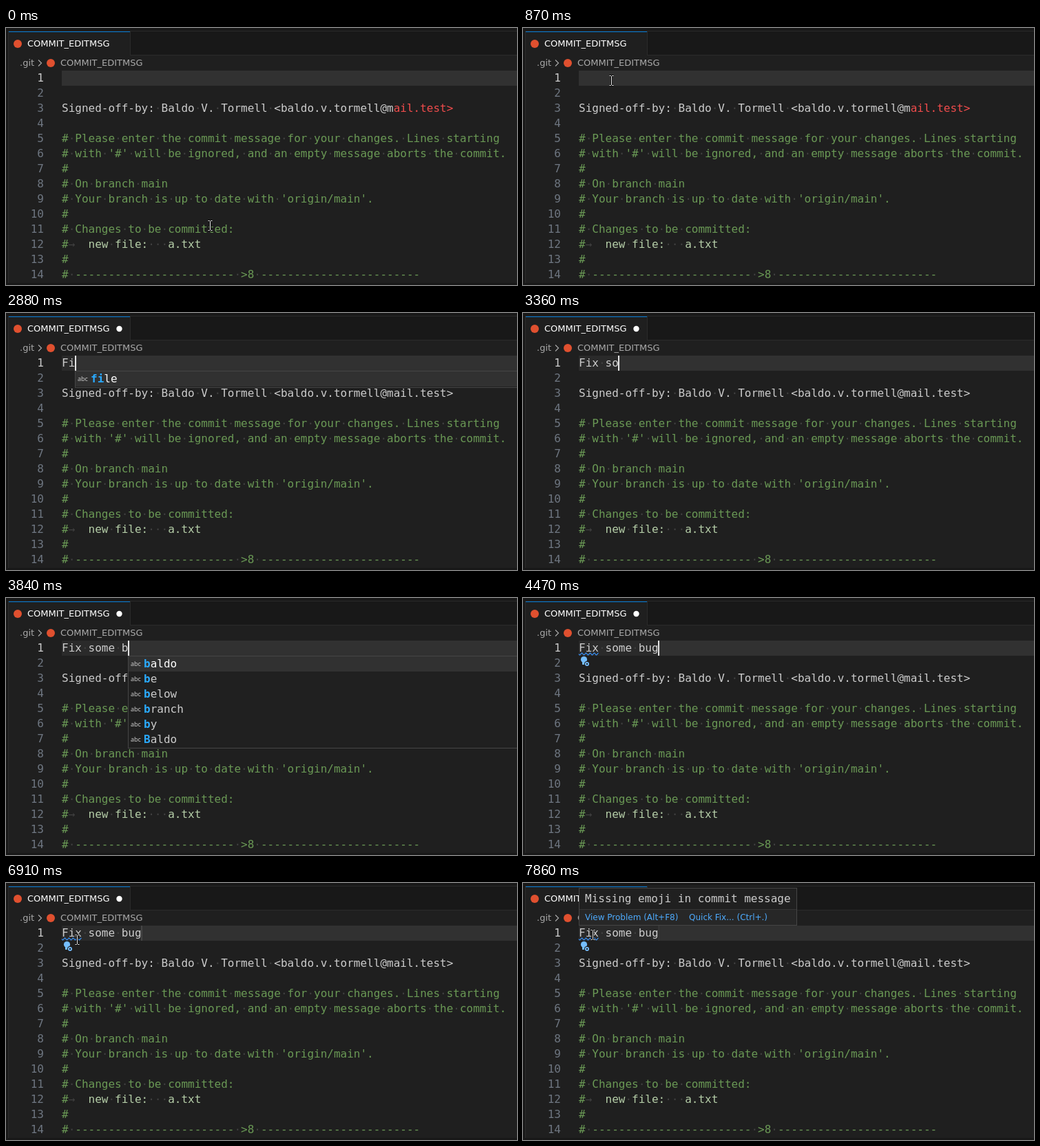
Recreate the animation shown at these times as an HTML page with a canvas. Size 742 by 374 pixels, loop 8000 ms.

```html
<!DOCTYPE html>
<html lang="en">
<head>
<meta charset="utf-8">
<title>Commit message editor</title>
<style>
  html, body { margin: 0; width: 100%; height: 100%; overflow: hidden; background: #1f1f1f; }
  canvas { display: block; }
</style>
</head>
<body>
<canvas id="stage" width="742" height="374"></canvas>
<script>
const ctx = document.getElementById('stage').getContext('2d');
const LOOP = 8000, W = 742, H = 374;
const LEFT = 81, TOP = 62, ROW = 22;
const MONO = '16px "DejaVu Sans Mono", monospace';
const MONO_BOLD = 'bold ' + MONO;
const UI = '13px "DejaVu Sans", sans-serif';
const UI_SMALL = '12px "DejaVu Sans", sans-serif';
const GREEN = '#6a9955', PLAIN = '#cccccc', BLUE = '#2aaaff', LINK = '#4daafc';

const SIGNED = 'Signed-off-by: Baldo V. Tormell <baldo.v.tormell@mail.test>';
const SUBJECT_LIMIT = 50;
const DASHES = '-'.repeat(24);
const COMMENTS = [
  '# Please enter the commit message for your changes. Lines starting',
  "# with '#' will be ignored, and an empty message aborts the commit.",
  '#',
  '# On branch main',
  "# Your branch is up to date with 'origin/main'.",
  '#',
  '# Changes to be committed:',
  '#',
  '#',
  `# ${DASHES} >8 ${DASHES}`
];

const MESSAGE = 'Fix some bug';
const KEYSTROKES = [2720, 2880, 3040, 3120, 3190, 3350, 3430, 3510, 3680, 3760, 3910, 4230];
const SUGGESTIONS = [
  { from: 2800, to: 2880, match: 1, words: ['file', 'for'] },
  { from: 2880, to: 3040, match: 2, words: ['file'] },
  { from: 3840, to: 3910, match: 1, words: ['baldo', 'be', 'below', 'branch', 'by', 'Baldo'] }
];

const CARET_ON = 1110, FADE = 180;
const CARET_FADES = [1750, 2150, 4860, 5260, 5810, 6220, 6770, 7200, 7700];
const SQUIGGLE_AT = 4310, BULB_AT = 4470, HOVER_AT = 7200;

// Each pointer track is a list of [time, x, y].
const POINTER_TRACKS = [
  { until: 1110, keys: [[0, 296.5, 287.5], [870, 128.5, 76.5], [950, 127.5, 75.5]] },
  { until: 1900, keys: [[1110, 187.5, 75.5], [1500, 187.5, 75.5], [1900, 297.5, 160.5]] },
  { until: LOOP, keys: [[5660, 310.5, 326.5], [5970, 208.5, 239.5], [6440, 116.5, 128.5], [6980, 101.5, 75.5]] }
];

const clamp = v => Math.max(0, Math.min(1, v));
const smooth = v => v * v * (3 - 2 * v);

function rect(x, y, w, h, color) {
  ctx.fillStyle = color;
  ctx.fillRect(x, y, w, h);
}

function disc(x, y, r, color) {
  ctx.fillStyle = color;
  ctx.beginPath();
  ctx.arc(x, y, r, 0, Math.PI * 2);
  ctx.fill();
}

function line(points, color, width = 1) {
  ctx.strokeStyle = color;
  ctx.lineWidth = width;
  ctx.beginPath();
  points.forEach(([x, y]) => ctx.lineTo(x, y));
  ctx.stroke();
}

function text(str, x, y, color, font = MONO, align = 'left') {
  ctx.font = font;
  ctx.fillStyle = color;
  ctx.textAlign = align;
  ctx.fillText(str, x, y);
}

ctx.font = MONO;
const CHAR = ctx.measureText('0').width;
const colX = col => LEFT + col * CHAR;
const baseline = row => TOP + (row - 1) * ROW + 16;

function code(str, row, color, col = 0) {
  text(str, colX(col), baseline(row), color);
  const dots = str.replace(/\S/g, '\u00a0').replace(/ /g, '·');
  text(dots, colX(col), baseline(row), '#414141');
}

function drawChrome(dirty) {
  rect(0, 0, W, H, '#1f1f1f');
  rect(0, 0, W, 40, '#181818');
  rect(0, 0, 3, H, '#181818');
  rect(3, 4, W, 1, '#2b2b2b');
  rect(3, 4, 1, H, '#2b2b2b');
  rect(4, 5, 176, 35, '#1f1f1f');
  rect(4, 5, 176, 1, '#0078d4');
  rect(180, 5, 1, 35, '#2b2b2b');
  rect(180, 39, W, 1, '#2b2b2b');
  rect(3, 371, W, 3, '#181818');

  disc(17, 23, 6, '#e0502f');
  text('COMMIT_EDITMSG', 31, 27, '#ffffff', UI);
  if (dirty) disc(164.5, 23, 4.2, '#ffffff');

  text('.git', 20, 55, '#a9a9a9', UI);
  line([[47, 46.5], [51.5, 51], [47, 55.5]], '#a9a9a9', 1.2);
  disc(65, 51, 6, '#e0502f');
  text('COMMIT_EDITMSG', 79, 55, '#a9a9a9', UI);
}

function drawDocument(typed) {
  rect(LEFT, TOP, W - LEFT, ROW, '#313131');
  rect(LEFT, TOP, typed.length * CHAR, ROW, '#2a2a2a');
  for (let n = 1; n <= 14; n++) {
    text(n, 55, baseline(n), n === 1 ? PLAIN : '#6e7681', MONO, 'right');
  }
  code(typed, 1, PLAIN);

  const normal = typed ? SIGNED.length : SUBJECT_LIMIT;
  code(SIGNED.slice(0, normal), 3, PLAIN);
  code(SIGNED.slice(normal), 3, '#f14c4c', normal);

  COMMENTS.forEach((str, i) => code(str, i + 5, GREEN));
  text('→', colX(1), baseline(12), '#414141');
  code('new file:   a.txt', 12, '#b5cea8', 4);
}

function caretOpacity(t) {
  if (t < CARET_ON) return 0;
  let opacity = 1;
  CARET_FADES.forEach((start, i) => {
    if (t < start) return;
    const p = smooth(clamp((t - start) / FADE));
    opacity = i % 2 ? p : 1 - p;
  });
  return opacity;
}

function drawCaret(t, col) {
  ctx.globalAlpha = caretOpacity(t);
  rect(Math.floor(colX(col)), TOP, 2, ROW, '#e4e4e4');
  ctx.globalAlpha = 1;
}

function drawSuggestions({ words, match }, caretX) {
  const x = Math.floor(caretX), h = words.length * ROW + 2;
  rect(x, 84, W - x, h + 1, '#454545');
  rect(x + 1, 85, W - x, h - 1, '#202020');
  rect(x + 1, 85, W - x, ROW, '#313131');
  words.forEach((word, i) => {
    const y = 101 + i * ROW;
    text('abc', x + 4, y - 2, '#cccccc', '9px "Noto Sans", sans-serif');
    text(word.slice(0, match), x + 23, y, BLUE, MONO_BOLD);
    text(word.slice(match), x + 23 + match * CHAR, y, i ? PLAIN : '#ffffff');
  });
}

function drawSquiggle() {
  const points = [];
  for (let x = LEFT; x <= colX(3); x += 0.5) {
    points.push([x, 81.5 + 1.4 * Math.sin((x - LEFT) * Math.PI / 3)]);
  }
  line(points, '#3794ff', 1.2);
}

function drawBulb() {
  const color = '#75beff';
  disc(88.5, 89.5, 4.6, color);
  rect(86, 92, 5, 5, color);
  disc(93, 96, 4, '#1f1f1f');
  disc(93, 96, 3, color);
  disc(93, 96, 1.2, '#1f1f1f');
}

function drawHover(t) {
  ctx.globalAlpha = clamp((t - HOVER_AT) / 150);
  rect(81, 7, 317, 55, '#454545');
  rect(82, 8, 315, 53, '#202020');
  rect(82, 38, 315, 1, '#353535');
  rect(82, 39, 315, 22, '#272727');
  text('Missing emoji in commit message', 90, 28, PLAIN);
  text('View Problem (Alt+F8)', 90, 54, LINK, UI_SMALL);
  text('Quick Fix... (Ctrl+.)', 241, 54, LINK, UI_SMALL);
  ctx.globalAlpha = 1;
}

function pointerAt(t) {
  const track = POINTER_TRACKS.find(({ until, keys }) => t >= keys[0][0] && t < until);
  if (!track) return null;
  const { keys } = track;
  const next = keys.findIndex(key => key[0] > t);
  if (next < 0) return keys[keys.length - 1].slice(1);
  const [t0, x0, y0] = keys[next - 1], [t1, x1, y1] = keys[next];
  const raw = (t - t0) / (t1 - t0);
  const p = t0 === 0 ? smooth(raw) : raw;
  return [Math.floor(x0 + (x1 - x0) * p) + 0.5, Math.floor(y0 + (y1 - y0) * p) + 0.5];
}

function drawPointer(t) {
  const pos = pointerAt(t);
  if (!pos) return;
  const [x, y] = pos;
  for (const [color, width] of [['#101010', 3], ['#f0f0f0', 1]]) {
    line([[x, y - 6], [x, y + 6]], color, width);
    for (const side of [-1, 1]) {
      line([[x - 3, y + side * 7], [x - 1, y + side * 7], [x, y + side * 6],
            [x + 1, y + side * 7], [x + 3, y + side * 7]], color, width);
    }
  }
}

function draw(t) {
  const typed = MESSAGE.slice(0, KEYSTROKES.filter(time => time <= t).length);
  drawChrome(typed.length > 0);
  drawDocument(typed);
  if (t >= SQUIGGLE_AT) drawSquiggle();
  if (t >= BULB_AT) drawBulb();
  const list = SUGGESTIONS.find(s => t >= s.from && t < s.to);
  if (list) drawSuggestions(list, colX(typed.length));
  drawCaret(t, typed.length);
  if (t >= HOVER_AT) drawHover(t);
  drawPointer(t);
}

const start = performance.now();
function tick() {
  draw((performance.now() - start) % LOOP);
  requestAnimationFrame(tick);
}
tick();
</script>
</body>
</html>
```
